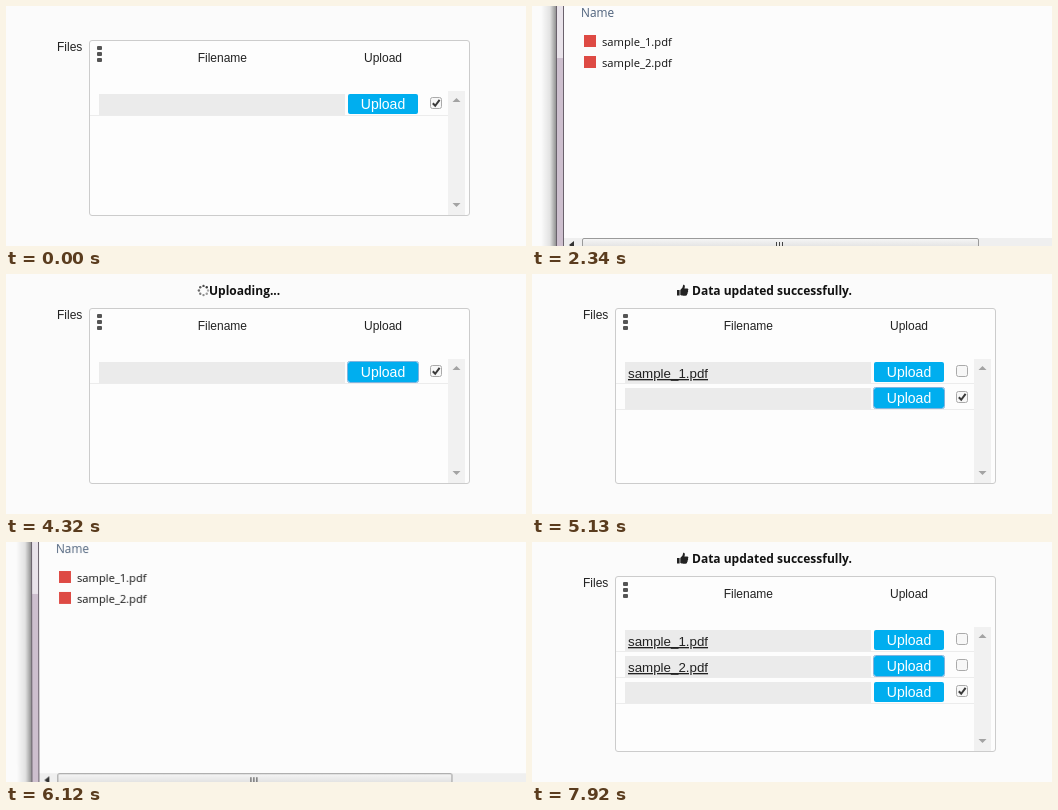
Recreate the animation shown at these times as an HTML page. Size 520 px wide and 240 px high, loop 8.19 s.

```html
<!DOCTYPE html>
<html lang="en">
<head>
<meta charset="utf-8">
<title>File upload</title>
<style>
  html, body { margin: 0; width: 100%; height: 100%; overflow: hidden; background: #fbfbfb; }
  #stage { position: relative; width: 520px; height: 240px; overflow: hidden; }
  svg { position: absolute; left: 0; top: 0; overflow: visible; }
  #page { font: 12px "Liberation Sans", Arial, sans-serif; fill: #222; }
  .btn { font-size: 14px; fill: #fff; }
  .link { font-size: 13.33px; text-decoration: underline; }
  .msg { font: bold 12px "Open Sans", sans-serif; fill: #111; }
  #dialog { font: 11.2px "Open Sans", sans-serif; fill: #111; transform-origin: 0 0; }
</style>
</head>
<body>
<div id="stage">
  <svg id="page" width="520" height="240">
    <text x="51" y="45">Files</text>
    <rect x="83.5" y="34.5" width="380" height="175" rx="2.5" fill="#fdfdfd" stroke="#ccc"/>
    <g fill="#555">
      <rect x="91" y="40" width="5" height="4" rx="1"/>
      <rect x="91" y="46" width="5" height="4" rx="1"/>
      <rect x="91" y="52" width="5" height="4" rx="1"/>
    </g>
    <text x="191.7" y="56">Filename</text>
    <text x="358" y="56">Upload</text>
    <g id="rows"></g>
    <rect x="442" y="85" width="17" height="124" fill="#f1f1f1"/>
    <path d="M446.5 96l4-4 4 4zM446.5 197l4 4 4-4z" fill="#a3a3a3"/>
    <g id="busy">
      <g id="spin"></g>
      <text class="msg" x="203" y="21">Uploading...</text>
    </g>
    <g id="done">
      <path fill="#222" d="M145 16h2.6v5.5H145zM148.3 16l2.2-2.6.7-2.6c1.6-.3 2.2 1.4 1.2 3.7h2.8c1.4.1 1.5 1.6.7 2.1.5.7.3 1.5-.3 1.8.3.8 0 1.3-.5 1.6.2 1.1-.5 1.7-1.6 1.7h-2.3c-1.2 0-1.8-.6-2.9-.7z"/>
      <text class="msg" x="160" y="21">Data updated successfully.</text>
    </g>
  </svg>

  <svg id="dialog" width="800" height="400">
    <defs>
      <linearGradient id="shade">
        <stop offset="0" stop-opacity="0"/>
        <stop offset=".6" stop-opacity=".1"/>
        <stop offset="1" stop-opacity=".42"/>
      </linearGradient>
      <linearGradient id="blue" x2="0" y2="1">
        <stop offset="0" stop-color="#dcebfc"/>
        <stop offset="1" stop-color="#c1dbfc"/>
      </linearGradient>
      <linearGradient id="thumb" x2="0" y2="1">
        <stop offset="0" stop-color="#f6f6f6"/>
        <stop offset=".5" stop-color="#e6e6e6"/>
        <stop offset="1" stop-color="#d4d4d4"/>
      </linearGradient>
    </defs>
    <rect x="9" y="-40" width="15" height="400" fill="url(#shade)"/>
    <rect x="24" y="-40" width="776" height="92" fill="#e9e3ea"/>
    <rect x="24" y="52" width="776" height="308" fill="#cdbfce"/>
    <path d="M24.5-40V360M31.5-40V360" stroke="#6a626c"/>
    <rect x="32" y="-40" width="768" height="400" fill="#fcfcfc"/>
    <text x="49" y="11" font-size="11.8" fill="#4c607a">Name</text>
    <g id="files"></g>
    <rect x="32" y="232" width="768" height="16" fill="#efefef"/>
    <path d="M42 235v8l-5-4z" fill="#333"/>
    <rect x="50.5" y="232.5" width="396" height="14" rx="1.5" fill="url(#thumb)" stroke="#9a9a9a"/>
    <path d="M244.500 236v6M247.500 236v6M250.500 236v6" stroke="#444"/>
    <rect x="32" y="249" width="768" height="111" fill="#f3f3f3"/>
    <rect x="227.500" y="256.500" width="198" height="22" fill="#fff" stroke="#aaa"/>
    <rect x="436.500" y="256.500" width="200" height="22" fill="#fff" stroke="#aaa"/>
  </svg>
</div>

<script>
const LOOP = 8190, TICK = 30;
const $ = id => document.getElementById(id);
const clamp = v => Math.max(0, Math.min(1, v));
const show = (el, on) => { el.style.display = on ? '' : 'none'; };
const within = (t, spans) => spans.some(([a, b]) => t >= a && t < b);

// Upload list: each row is 26px below the last one.
$('rows').innerHTML = [1, 2, 3].map((n, i) => `
  <g id="row${i}" transform="translate(0 ${26 * i})">
    <path d="M84 109.500H442" stroke="#ececec"/>
    <rect x="93" y="88" width="246" height="21" fill="#ebebeb"/>
    <text class="link" id="link${i}" x="96" y="104">sample_${n}.pdf</text>
    <rect x="342" y="88" width="70" height="20" rx="2" fill="#00aeef"/>
    <rect id="ring${i}" x="341.500" y="87.500" width="71" height="21" rx="2" fill="none" stroke="#7fb4de"/>
    <text class="btn" x="354.800" y="103">Upload</text>
    <rect x="424.500" y="91.500" width="11" height="11" rx="2" fill="#f7f7f7" stroke="#aaa"/>
    <path id="tick${i}" d="M426.800 97.200l2.400 2.600 4.400-6" fill="none" stroke="#3a3a3a" stroke-width="2"/>
  </g>`).join('');

$('files').innerHTML = [1, 2].map((n, i) => `
  <g transform="translate(0 ${21 * i})">
    <rect id="mark${i}" x="46.500" y="25.500" width="740" height="21" rx="2" fill="url(#blue)" stroke="#84aede"/>
    <rect x="52" y="29" width="12" height="12" fill="#de4a44"/>
    <text x="70" y="40">sample_${n}.pdf</text>
  </g>`).join('');

$('spin').innerHTML = Array.from({ length: 8 }, (_, i) => {
  const a = i * Math.PI / 4;
  const x = 197.5 + 4.6 * Math.cos(a), y = 16.5 + 4.6 * Math.sin(a);
  return `<circle cx="${x}" cy="${y}" r="1.2" fill="#333" opacity="${0.4 + i * 0.08}"/>`;
}).join('');

const OPEN = [[1980, 2010], [5880, 5880]];   // [first step, motion start]
const CLOSE = [3930, 7170];
const BUSY = [[4200, 4500], [7560, 7920]];
const UPLOADED = [4500, 7920];
const RINGS = [
  [[1230, 1710], [3930, 5040]],
  [[5040, 5640], [7170, LOOP]],
  []
];

// Tilted, slightly shrunken window; q = 0 is the resting pose.
function tilt(q) {
  if (q <= 0) return 'none';
  const mid = 335, s = 1 - q, k = 0.00166 * q;
  const m = [s, 0, 0, 0, mid * k, 1 - 0.73 * q, 0, k, 0, 0, 1, 0, mid * q, 28 * q, 0, 1];
  return `matrix3d(${m.map(v => v.toFixed(7))})`;
}

function drawDialog(t) {
  const i = t >= OPEN[1][0] ? 1 : 0;
  const [first, start] = OPEN[i];
  let alpha = 0, q = 0;
  if (t >= CLOSE[i]) {
    const n = (t - CLOSE[i]) / TICK + 1;
    alpha = clamp(1 - n / 8);
    q = 0.01 * n;
  } else if (t >= first) {
    const n = Math.max(0, t - start) / TICK;
    alpha = clamp(0.25 + 0.13 * n);
    q = 0.067 * Math.pow(1 - clamp(n / 11), 2.3);
  }
  const el = $('dialog');
  show(el, alpha > 0);
  el.style.opacity = alpha;
  el.style.transform = tilt(q);
}

function drawMarks(t) {
  const ramp = (at, len) => clamp((t - at + TICK) / len);
  const one = t < OPEN[1][0] ? 0.5 * ramp(2880, 120) + 0.5 * ramp(3330, 90) : 0;
  const two = 0.5 * ramp(6360, 60) + 0.5 * ramp(7110, TICK);
  $('mark0').style.opacity = one;
  $('mark1').style.opacity = two;
}

function drawPage(t) {
  const count = UPLOADED.filter(at => t >= at).length;
  for (let i = 0; i < 3; i++) {
    show($('row' + i), i <= count);
    show($('link' + i), i < count);
    show($('tick' + i), i === count);
    show($('ring' + i), within(t, RINGS[i]));
  }
  const busy = within(t, BUSY);
  show($('busy'), busy);
  show($('done'), count > 0 && !busy);
  $('spin').setAttribute('transform', `rotate(${Math.floor(t / 60) * 45} 197.5 16.5)`);
}

const begin = performance.now();
function frame() {
  const now = (performance.now() - begin) % LOOP;
  const t = Math.floor(now / TICK) * TICK;
  drawPage(t);
  drawMarks(t);
  drawDialog(t);
  requestAnimationFrame(frame);
}
frame();
</script>
</body>
</html>
```
